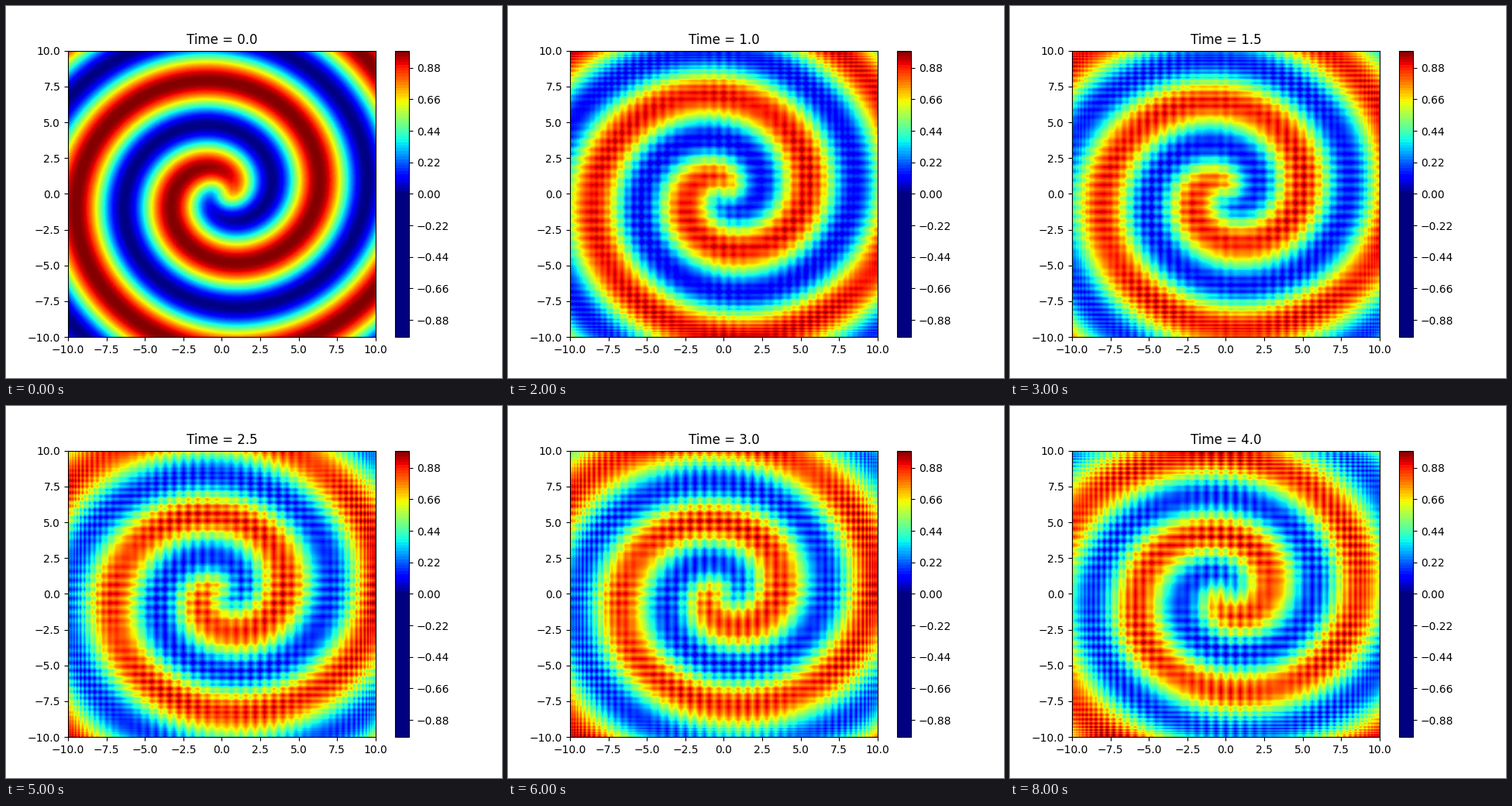
Animation of 640x480 px, one loop 9 s. Source, as a matplotlib script:

```python
import numpy as np
import matplotlib.pyplot as plt
from matplotlib.animation import FuncAnimation

N = 100          # Chebyshev intervals per side
HALF = 10.0      # half width of the domain
STEPS = 9
DT = 0.5
OMEGA = 0.9      # angular speed of the spiral
LEVELS = np.linspace(-1, 1, 101)

index = np.arange(N + 1)
nodes = -HALF * np.cos(np.pi * index / N)
X, Y = np.meshgrid(nodes, nodes)
R = np.hypot(X, Y)
THETA = np.arctan2(Y, X)
SIGN_X, SIGN_Y = np.meshgrid((-1.0) ** index, (-1.0) ** index)


def edge_drift(along, across):
    """Extra phase speed near the middle of an edge."""
    return along**4 / (along**4 + 1500) * np.exp(-((across / 8.5) ** 4))


DRIFT = 0.26 * edge_drift(Y, X) + 0.10 * edge_drift(X, Y)


def ripple(sign, pos, k, lag, t):
    """Point-to-point ripple whose calm zone travels inward."""
    return sign * np.cos(k * np.abs(pos) + 0.85 * t - lag)


def field(t):
    wave = 0.66 + 0.34 * np.exp(-1.2 * t)
    rough = 0.19 * (1 - np.exp(-t))
    phase = THETA - R - (OMEGA + DRIFT) * t
    u = wave * np.tanh(R) * np.cos(phase)
    u += rough * ripple(SIGN_X, X, 0.45, 0.23, t)
    u += rough * ripple(SIGN_Y, Y, 0.50, 2.0, t)
    return np.clip(u, -0.9999, 0.9999)


fig, ax = plt.subplots(figsize=(6.4, 4.8), dpi=100)
scale = ax.contourf(X, Y, field(0), levels=LEVELS, cmap="jet", vmin=0, vmax=1)
fig.colorbar(scale, ax=ax)


def update(step):
    t = step * DT
    ax.clear()
    ax.contourf(X, Y, field(t), levels=LEVELS, cmap="jet", vmin=-1, vmax=1)
    ax.set_title(f"Time = {t:.1f}")
    return []


anim = FuncAnimation(fig, update, frames=STEPS, interval=1000,
                     repeat=True, repeat_delay=0, blit=False)
plt.show()
```
